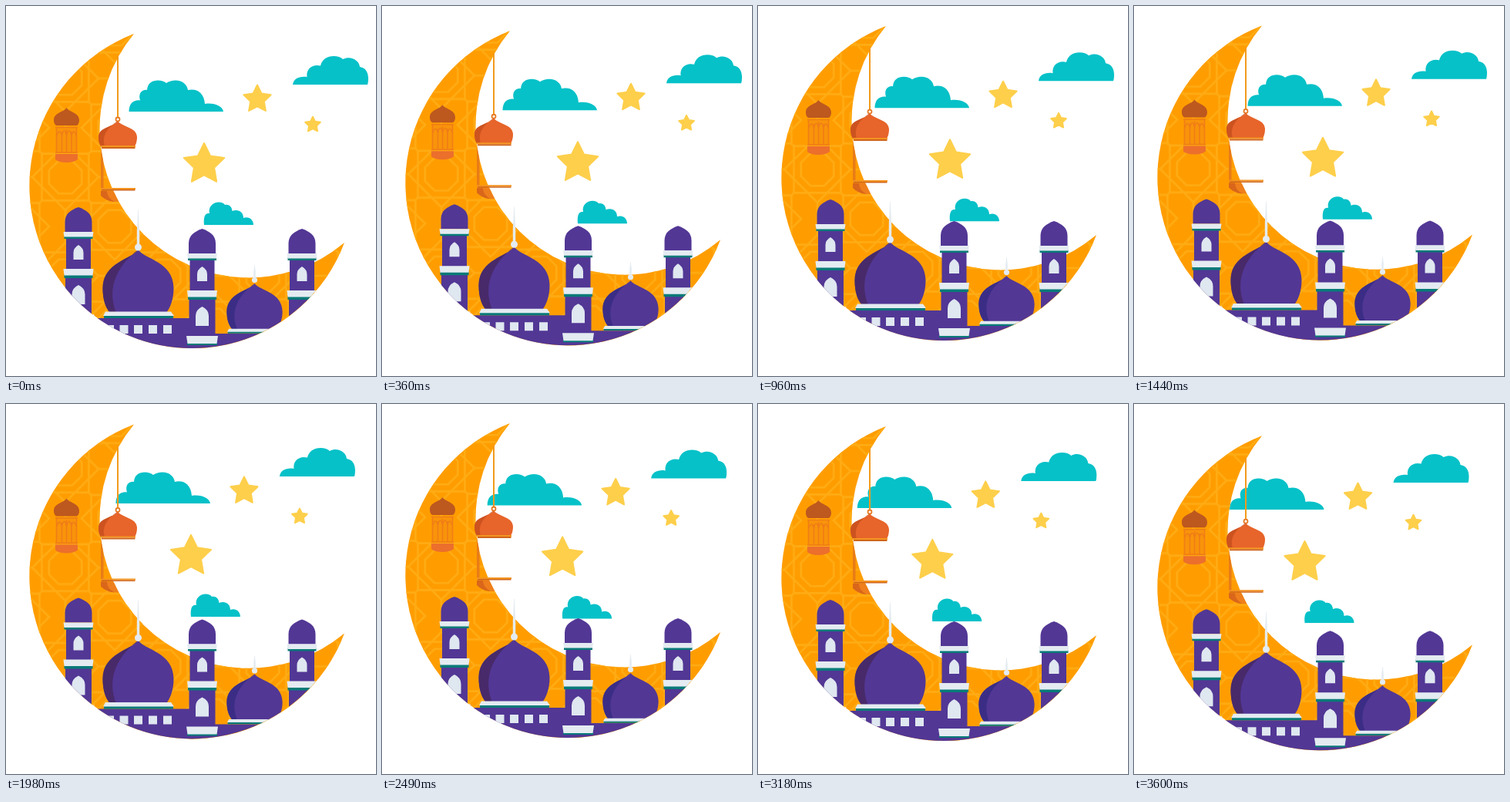
An HTML page for the animation above (4.53 s loop, 480 px wide and 480 px high).

```html
<!DOCTYPE html>
<html lang="en">
<head>
<meta charset="utf-8">
<title>Crescent night</title>
<style>
html, body { margin: 0; width: 100%; height: 100%; overflow: hidden; background: #fff; }
svg { display: block; width: 100vw; height: 100vh; }
</style>
</head>
<body>
<svg viewBox="0 0 480 480">
  <defs>
    <clipPath id="disc"><circle cx="241" cy="233" r="211"/></clipPath>
    <clipPath id="crescent"><path id="moonShape" d="M166 36A211 211 0 1 0 439 307A193.100 193.100 0 0 1 166 36Z"/></clipPath>
    <pattern id="lattice" x="13" y="158" width="128" height="128" patternUnits="userSpaceOnUse">
      <g id="tile" fill="none" stroke="#ffab14" stroke-width="2.600"></g>
    </pattern>
    <g id="tower">
      <path fill="#523795" d="M237 321V308C237 297 245 292.500 254.500 289C264 292.500 272 297 272 308V321Z"/>
      <path fill="#523795" d="M238.500 329H270.500V370H238.500ZM237.500 379H271.500V430H237.500Z"/>
      <path fill="#087a78" d="M236 326H273V330H236ZM236 376H273V381H236ZM235 436H274V440H235Z"/>
      <path fill="#e4ebf1" d="M235 321H274L273 327.500H236ZM235 369H274L273 377.500H236ZM234 428H275L273.500 438H235.500Z"/>
      <path fill="#dfe7f0" d="M248 357V348Q248 342 254.500 338Q261 342 261 348V357ZM246 415V402Q246 394 254.500 390Q263 394 263 402V415Z"/>
    </g>
    <g id="dome">
      <path fill="#523795" d="M171.500 316C180 329 217 331 217.500 366C217.500 381 213 391 208 398H135C129 391 125.500 381 125.500 366C126 332 163 329 171.500 316Z"/>
      <path fill="currentColor" d="M171.500 316C163 329 126 332 125.500 366C125.500 381 129 391 135 398H143C133 372 137 343 171.500 316Z"/>
      <path fill="#087a78" d="M127 401H217V405H127Z"/>
      <path fill="#e4ebf1" d="M129 396.500H214L218 402H126Z"/>
    </g>
  </defs>

  <g id="sky">
    <g fill="#06c1c8">
      <path d="M159.500 137C159.500 126 166 121.500 174 122.500C171 113 177 108 183 109C183.500 100 190 96.500 197 96.500Q204 96.500 208 100Q213 96.500 220 96.500C229 96.500 235 102 236 109C247 106.500 257 112 258 127C270 125 281 130 282 137Z"/>
      <path d="M372 102C373 94 381 90.500 390.500 92C389 82 397 75 408 77.500C410 69 417 65 425 65Q433 65 437 69C447 64 458 70 459 79C467 80 470 87 470 94Q470 99 469 102Z"/>
      <path d="M257 284C256 274 258 268 264 269C262 260 269 254.500 276 254.500Q282 254.500 284 258C289 257 293 260 293.500 266C301 263 308 267 308 275C315 272.500 321 277 321 284Z"/>
    </g>
    <g id="stars" fill="#fecf4b" stroke="#fecf4b" stroke-width="2" stroke-linejoin="round"></g>
  </g>

  <g id="scene">
    <use href="#moonShape" fill="#ff9d00"/>
    <use href="#moonShape" fill="url(#lattice)"/>

    <g>
      <path fill="#f9940a" d="M65 157H92V191H65Z"/>
      <path fill="#bd581f" d="M78.500 132C82 138 95 138 95 148Q95 153 92 155H65Q62 153 62 148C62 138 75 138 78.500 132Z"/>
      <path fill="none" stroke="#f07d16" stroke-width="1.600" d="M64 157.500H93M65.500 158V190M91.500 158V190M72.500 163V190M78.500 160V190M85 163V190M66 168Q69 158 72.500 168Q75.500 156 78.500 168Q82 156 85 168Q88 158 91 168M64 190H93"/>
      <path fill="#ec6f2c" d="M64 192H93V199Q88 203 78.500 203Q68 203 64 199Z"/>
    </g>

    <g clip-path="url(#crescent)">
      <path fill="#e87c18" d="M123 185H126.500V237H123Z"/>
      <path fill="#ee7f1c" d="M123 240H168V246Q160 254 145 254Q130 254 123 246Z"/>
      <path fill="#d9661a" d="M123 240H131Q131 249 141 254Q130 253 123 246Z"/>
    </g>
    <path fill="none" stroke="#f29a1c" stroke-width="2" d="M145 65V144"/>
    <circle cx="145" cy="147" r="2.500" fill="none" stroke="#e77b22" stroke-width="1.800"/>
    <path fill="#e7642a" d="M145 149C150 157 170 157 170 170Q170 177 167 182H123Q120 177 120 170C120 157 140 157 145 149Z"/>
    <path fill="#cc5320" d="M145 149C140 157 120 157 120 170Q120 177 123 182H128Q122 164 145 149Z"/>
    <path fill="#f39420" d="M123 181H168V183H123ZM123 236H168V238H123Z"/>
    <path fill="#cf641c" d="M124 183H167.500V185H124ZM124 238H167.500V239.500H124Z"/>

    <g clip-path="url(#disc)">
      <path fill="#523795" d="M112 405H255V425H350V450H112Z"/>
      <path id="panes" fill="#dfe7f0"/>
      <use href="#dome" color="#482a6a"/>
      <use href="#dome" color="#3b2d86" transform="translate(187.900 129.200) scale(.785 .73)"/>
      <use href="#tower" x="-160.500" y="-28"/>
      <use href="#tower"/>
      <use href="#tower" x="129.500"/>
    </g>
    <g fill="#e4ebf1">
      <path d="M171.200 264H171.800L173.200 292V312H169.800V292Z"/>
      <circle cx="171.500" cy="313" r="4.500"/>
      <path d="M322.200 336H322.800L323.800 345V356H321.200V345Z"/>
      <circle cx="322.500" cy="355.500" r="3.600"/>
    </g>
  </g>
</svg>
<script>
const LOOP = 4530, STEP = 30, END = 3600;
const $ = id => document.getElementById(id);

// Closed polygon; alternating radii give a star.
function ring(cx, cy, n, radii, turn) {
  const pts = Array.from({ length: n }, (_, i) => {
    const a = turn + i * 2 * Math.PI / n, r = radii[i % radii.length];
    return (cx + r * Math.cos(a)).toFixed(2) + ' ' + (cy + r * Math.sin(a)).toFixed(2);
  });
  return 'M' + pts.join('L') + 'Z';
}

function addPath(parent, d) {
  const p = document.createElementNS('http://www.w3.org/2000/svg', 'path');
  p.setAttribute('d', d);
  parent.append(p);
}

for (const [x, y, r] of [[257, 205.500, 27.500], [326, 121, 18.500], [398, 154, 10.300]])
  addPath($('stars'), ring(x, y, 10, [r, r * .5], -Math.PI / 2));

for (const [x, y] of [[64, 64], [0, 0], [128, 0], [0, 128], [128, 128]]) {
  addPath($('tile'), ring(x, y, 4, [43], 0) + ring(x, y, 4, [43], Math.PI / 4));
  addPath($('tile'), ring(x, y, 8, [23], Math.PI / 8));
}
addPath($('tile'), 'M64 0V21M64 107V128M0 64H21M107 64H128M30 30L34 34M94 94L98 98M98 30L94 34M34 94L30 98');

$('panes').setAttribute('d', [129, 147.500, 166, 185, 204]
  .map(x => `M${x} 414h11v11h-11Z`).join(''));

// Keys are [time, value] pairs joined by straight lines.
function track(keys, t) {
  let i = 1;
  while (i < keys.length - 1 && t > keys[i][0]) i++;
  const [t0, a] = keys[i - 1], [t1, b] = keys[i];
  return a + (b - a) * (t - t0) / (t1 - t0);
}

const moonY = [[0, 0], [1080, -11.200], [1980, -9.600], [2130, -8.400], [2490, -11], [2940, -14], [END, 5.200]];
const skyX = [[0, 0], [1800, -15], [END, -35.500]];
const skyY = [[0, 0], [1800, -9], [END, 0]];

function draw(ms) {
  const t = Math.min(END, Math.floor(ms % LOOP / STEP) * STEP);
  $('scene').setAttribute('transform', `translate(0 ${track(moonY, t)})`);
  $('sky').setAttribute('transform', `translate(${track(skyX, t)} ${track(skyY, t)})`);
}

const start = performance.now();
function tick() {
  draw(performance.now() - start);
  requestAnimationFrame(tick);
}
tick();
</script>
</body>
</html>
```
